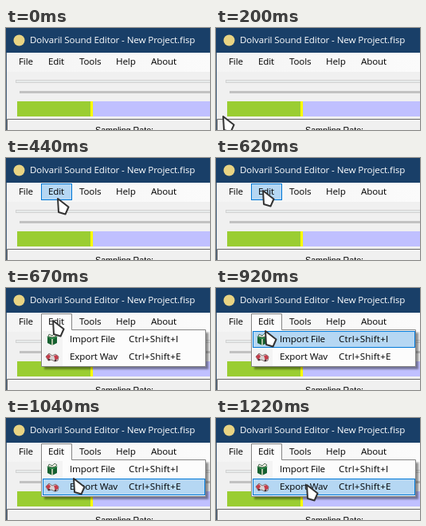
Recreate the animation shown at these times as an HTML page. Size 256 px wide and 128 px high, loop 1.52 s.

```html
<!DOCTYPE html>
<html lang="en">
<head>
<meta charset="utf-8">
<title>Sound editor menu</title>
<style>
  html, body { margin: 0; width: 100%; height: 100%; overflow: hidden; background: #f0f0f0; }
  svg { display: block; width: 256px; height: 128px; }
  text { font: 11.6px "Open Sans", "Noto Sans", sans-serif; letter-spacing: -.12px; fill: #000; }
  .title { fill: #fff; letter-spacing: -.1px; }
  .keys { letter-spacing: .2px; }
  .label { font: 10.7px "Liberation Sans", Arial, sans-serif; letter-spacing: 0; }
  .hot { fill: #b5d7f3; stroke: #0078d7; }

  /* Every part steps through the same 1520 ms timeline. */
  #hover, #menu, #import, #export, #cursor { animation: 1520ms step-end infinite; }
  #hover, #menu, #import, #export { visibility: hidden; }
  #hover { animation-name: hover; }
  #menu { animation-name: menu; }
  #import { animation-name: import; }
  #export { animation-name: export; }
  #cursor { animation-name: move; }

  @keyframes hover {
    0% { visibility: hidden; }
    28.94% { visibility: visible; }
    44.07%, 100% { visibility: hidden; }
  }
  @keyframes menu {
    0% { visibility: hidden; }
    44.07%, 100% { visibility: visible; }
  }
  @keyframes import {
    0% { visibility: hidden; }
    60.52% { visibility: visible; }
    68.42%, 100% { visibility: hidden; }
  }
  @keyframes export {
    0% { visibility: hidden; }
    68.42%, 100% { visibility: visible; }
  }
  @keyframes move {
    0% { transform: translate(-40px, 140px); }
    13.15% { transform: translate(9px, 111px); }
    17.1% { transform: translate(29px, 83px); }
    21.05% { transform: translate(46px, 63px); }
    24.99% { transform: translate(57px, 55px); }
    28.94% { transform: translate(65px, 51px); }
    32.89% { transform: translate(64px, 47px); }
    36.84% { transform: translate(61px, 43px); }
    40.78% { transform: translate(59px, 41px); }
    60.52% { transform: translate(62px, 54px); }
    64.47% { transform: translate(73px, 66px); }
    68.42% { transform: translate(85px, 76px); }
    72.36% { transform: translate(98px, 81px); }
    76.31% { transform: translate(108px, 83px); }
    80.26%, 100% { transform: translate(114px, 84px); }
  }
</style>
</head>
<body>
<svg viewBox="0 0 256 128">
  <defs>
    <linearGradient id="strip">
      <stop offset="0" stop-color="#f4f4f4"/>
      <stop offset="1" stop-color="#fbfbfb"/>
    </linearGradient>
    <filter id="blur"><feGaussianBlur stdDeviation="1.2"/></filter>
  </defs>

  <!-- Window -->
  <rect width="256" height="128" fill="#f0f0f0"/>
  <rect y="31" width="256" height="24" fill="url(#strip)"/>
  <rect width="256" height="31" fill="#193f68"/>
  <rect y="31" width="1" height="97" fill="#49627d"/>
  <circle cx="16.5" cy="15.5" r="7" fill="#e8d383"/>
  <text class="title" x="30" y="19">Dolvaril Sound Editor - New Project.fisp</text>

  <!-- Sliders and progress -->
  <rect x="12.5" y="65.5" width="250" height="3" fill="#e7eaea" stroke="#d2d2d2"/>
  <rect x="17" y="79" width="239" height="3" fill="#c2c2c2"/>
  <rect x="14" y="92" width="242" height="19" fill="#c0c0ff"/>
  <rect x="14" y="92" width="92" height="19" fill="#9acd32"/>
  <rect x="106" y="92" width="3" height="19" fill="#ff0"/>
  <path d="M1.5 128V114.5H256" fill="none" stroke="#696969"/>
  <text class="label" x="112" y="132">Sampling Rate:</text>

  <!-- Menu -->
  <rect id="hover" class="hot" x="44.5" y="32.5" width="38" height="20"/>
  <g id="menu">
    <rect x="48" y="56" width="206" height="46" fill="#000" opacity=".4" filter="url(#blur)"/>
    <path d="M44.5 32.5H82.5V52.5H250.5V98.5H44.5Z" fill="#fcfcfc" stroke="#858585"/>
    <rect x="46" y="54" width="25" height="44" fill="#f4f4f4"/>
    <rect id="import" class="hot" x="46.5" y="54.5" width="203" height="20"/>
    <rect id="export" class="hot" x="46.5" y="76.5" width="203" height="20"/>
    <g>
      <path d="M52 62l6-2 6 2v7l-6 3-6-3z" fill="#14602f"/>
      <path d="M51 61l7-2 7 2-7 4z" fill="#2f8b4b"/>
      <path d="M58 64v8" stroke="#e5dfc8" stroke-width="1.5"/>
      <path d="M58 62l-5-1 1-3 4 2 3-3 3 2-2 2z" fill="#f4f1e4" stroke="#33513b" stroke-width=".8"/>
    </g>
    <g>
      <path d="M50 86l4-4 4 3 4-2 4 3-1 5-4 1-4-2-4 1z" fill="#d9d4d4" stroke="#6d5555" stroke-width=".8"/>
      <path d="M50 86l4-3 2 3-3 4zM60 85l4-1 2 4-4 3z" fill="#c43c4a"/>
      <circle cx="54" cy="90" r="1.3" fill="#4b3438"/>
      <circle cx="62" cy="91" r="1.3" fill="#4b3438"/>
    </g>
    <text x="80" y="68">Import File</text>
    <text class="keys" x="154" y="68">Ctrl+Shift+I</text>
    <text x="80" y="90">Export Wav</text>
    <text class="keys" x="154" y="90">Ctrl+Shift+E</text>
  </g>
  <text x="16" y="46">File</text>
  <text x="53" y="46">Edit</text>
  <text x="92" y="46">Tools</text>
  <text x="138" y="46">Help</text>
  <text x="182" y="46">About</text>

  <path id="cursor" d="M0 0L13.5 10.5L9.5 19.5L1 17Z" fill="#fff" stroke="#333" stroke-width="2" stroke-linejoin="round"/>
</svg>
</body>
</html>
```
